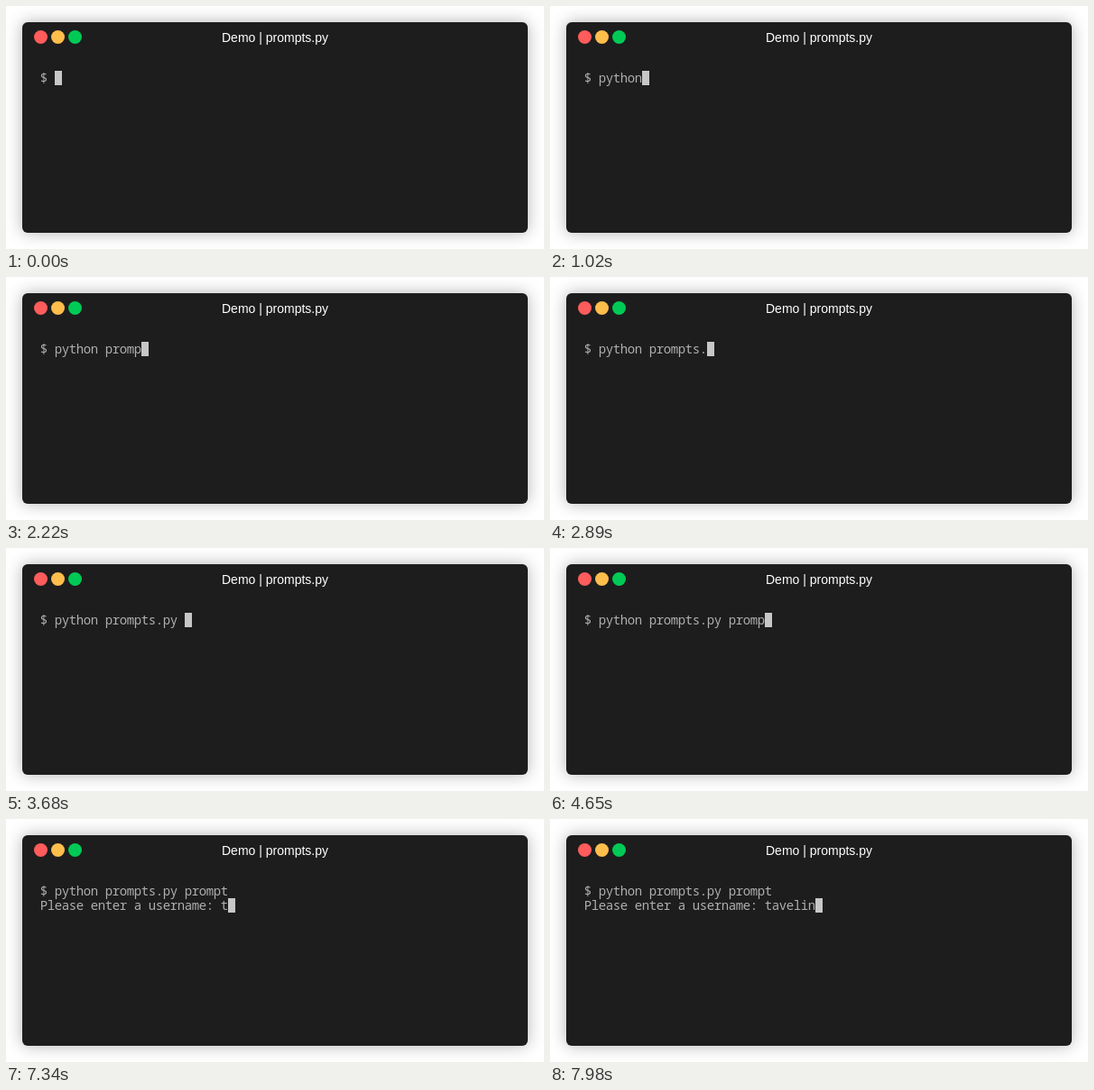
An HTML page with a canvas that plays this animation: 596 by 270 pixels, repeating every 8000 ms.

```html
<!DOCTYPE html>
<html lang="en">
<head>
<meta charset="utf-8">
<title>Demo | prompts.py</title>
<style>
  html, body { margin: 0; width: 100%; height: 100%; overflow: hidden; background: #fff; }
  canvas { display: block; }
</style>
</head>
<body>
<canvas id="stage" width="596" height="270"></canvas>
<script>
const LOOP = 8000;
const CELL = { w: 8, h: 16, left: 38, top: 72, baseline: 13 };
const COMMAND = 'python prompts.py prompt';
const QUESTION = 'Please enter a username: ';
const USERNAME = 'tavelin';

// Time in ms at which each character appears
const COMMAND_TIMES = [
  300, 420, 630, 730, 830, 1020, 1190,
  1340, 1460, 1570, 1760, 2220, 2460, 2660, 2890, 3110, 3210, 3680,
  4100, 4210, 4330, 4470, 4650, 4800
];
const ENTER_TIME = 5350;
const QUESTION_TIME = 5410;
const USERNAME_TIMES = [7340, 7440, 7550, 7660, 7770, 7910, 7980];

const ctx = document.getElementById('stage').getContext('2d');

function typed(text, times, t) {
  return text.slice(0, times.filter(at => at <= t).length);
}

function screenLines(t) {
  const lines = ['$ ' + typed(COMMAND, COMMAND_TIMES, t)];
  if (t >= ENTER_TIME) {
    lines.push(t < QUESTION_TIME ? '' : QUESTION + typed(USERNAME, USERNAME_TIMES, t));
  }
  return lines;
}

function drawWindow() {
  ctx.fillStyle = '#fff';
  ctx.fillRect(0, 0, 596, 270);

  ctx.save();
  ctx.shadowColor = 'rgba(0, 0, 0, 0.3)';
  ctx.shadowBlur = 18;
  ctx.fillStyle = '#1d1d1d';
  ctx.beginPath();
  ctx.roundRect(18, 18, 560, 234, 6);
  ctx.fill();
  ctx.restore();

  ['#ff5c5c', '#ffbd4c', '#00ca56'].forEach((color, i) => {
    ctx.fillStyle = color;
    ctx.beginPath();
    ctx.arc(38.5 + 19 * i, 34.5, 7.5, 0, Math.PI * 2);
    ctx.fill();
  });

  ctx.font = '14px "Liberation Sans", Arial, sans-serif';
  ctx.textAlign = 'left';
  ctx.fillStyle = '#fff';
  ctx.fillText('Demo | prompts.py', 239, 40);
}

function drawTerminal(lines) {
  ctx.font = '14px "Noto Sans Mono", "DejaVu Sans Mono", monospace';
  ctx.textAlign = 'center';
  ctx.fillStyle = '#afafaf';
  lines.forEach((line, row) => {
    const y = CELL.top + row * CELL.h + CELL.baseline;
    [...line].forEach((char, col) => {
      ctx.fillText(char, CELL.left + (col + 0.5) * CELL.w, y);
    });
  });

  const row = lines.length - 1;
  ctx.fillStyle = '#c7c7c7';
  ctx.fillRect(CELL.left + lines[row].length * CELL.w, CELL.top + row * CELL.h, CELL.w, CELL.h);
}

function frame() {
  drawWindow();
  drawTerminal(screenLines(performance.now() % LOOP));
  requestAnimationFrame(frame);
}

frame();
</script>
</body>
</html>
```
